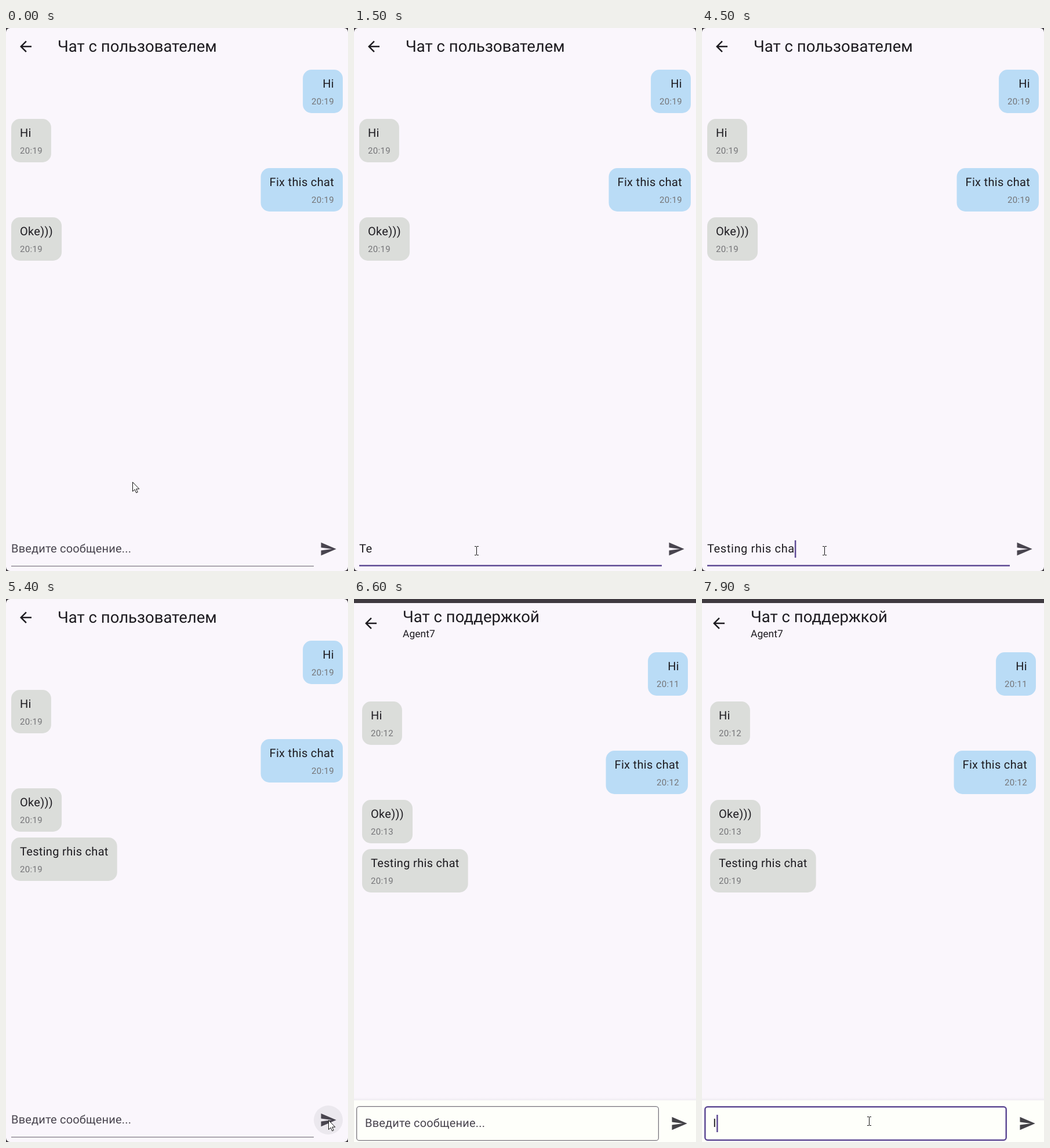
An HTML page with a canvas that plays this animation: 590 by 938 pixels, repeating every 8 s.

```html
<!DOCTYPE html>
<html lang="ru">
<head>
<meta charset="utf-8">
<title>Chat</title>
<style>
html, body { margin: 0; width: 100%; height: 100%; overflow: hidden; background: #3f3a40; }
canvas { display: block; }
</style>
</head>
<body>
<canvas width="590" height="938"></canvas>
<script>
const ctx = document.querySelector('canvas').getContext('2d');
ctx.textRendering = 'geometricPrecision';
const LOOP = 8000, SWITCH = 6300, SENT = 5400;
const INK = '#1d1b20', MUTED = '#49454f', ACCENT = '#5e4a94', DARK = '#3f3a40';
const PAGE = '#faf6fc', BLUE = '#badcf6', GREY = '#dbddda';
const BACK = new Path2D('M20 11H7.83l5.59-5.59L12 4l-8 8 8 8 1.41-1.41L7.83 13H20v-2z');
const SEND = new Path2D('M2.01 21L23 12 2.01 3 2 10l15 2-15 2z');
const ARROW = new Path2D('M.5 .5V16.5L4.2 13.2 6.7 18.9 9.2 17.8 6.7 12.2H11.8Z');
const HINT = 'Введите сообщение...';

// [text, sent by this user, time in first view, time in second view]
const messages = [
  ['Hi', true, '20:19', '20:11'],
  ['Hi', false, '20:19', '20:12'],
  ['Fix this chat', true, '20:19', '20:12'],
  ['Oke)))', false, '20:19', '20:13'],
  ['Testing rhis chat', false, '20:19', '20:19']
];

// when each letter of the typed message appears
const draft = messages[4][0];
const keys = [1000, 1100, 1600, 1700, 2000, 2200, 2400, 2700,
  3300, 3500, 3600, 3700, 3900, 4100, 4300, 4500, 4600];

// pointer way points: time, x, y
const way = [
  [0, 218, 784], [400, 211, 903], [5000, 211, 903], [5300, 556, 900], [5500, 556, 900],
  [5800, 499, 629], [5900, 522, 612], [6000, 557, 595], [6100, 620, 575],
  [7100, 600, 560], [7200, 560, 640], [7500, 288, 902], [LOOP, 288, 902]
];

function pointerAt(t) {
  const i = way.findIndex(p => p[0] > t), a = way[i - 1], b = way[i];
  const k = (t - a[0]) / (b[0] - a[0]);
  return [a[1] + (b[1] - a[1]) * k, a[2] + (b[2] - a[2]) * k];
}

function setFont(size, spacing) {
  ctx.font = size + 'px Roboto, sans-serif';
  ctx.letterSpacing = spacing + 'px';
}

// draws the text and returns its width
function text(str, x, y, size, color, spacing = 0) {
  setFont(size, spacing);
  ctx.fillStyle = color;
  ctx.fillText(str, x, y);
  return ctx.measureText(str).width;
}

function width(str, size) {
  setFont(size, 0.3125);
  return ctx.measureText(str).width;
}

function rect(x, y, w, h, color) {
  ctx.fillStyle = color;
  ctx.fillRect(x, y, w, h);
}

function round(x, y, w, h, r) {
  ctx.beginPath();
  ctx.roundRect(x, y, w, h, r);
}

function icon(path, x, y, color) {
  ctx.save();
  ctx.translate(x, y);
  ctx.scale(1.25, 1.25);
  ctx.fillStyle = color;
  ctx.fill(path);
  ctx.restore();
}

function bubble([str, mine, ...times], view, x, y) {
  const time = times[view], tw = width(time, 15), sw = width(str, 20);
  const w = Math.max(tw, sw) + 30, left = mine ? 590 - x - w : x;
  const place = own => mine ? left + w - 15 - own : left + 15;
  ctx.fillStyle = mine ? BLUE : GREY;
  round(left, y, w, 75, 15);
  ctx.fill();
  text(str, place(sw), y + 31, 20, INK, 0.3125);
  text(time, place(tw), y + 60, 15, '#757578', 0.3125);
}

// typed text or hint, with a caret that blinks anew after every key
function entry(str, x, y, focused, since) {
  const w = str ? text(str, x, y, 20, INK, 0.625) : 0;
  if (!str) text(HINT, x, y, 20, MUTED, 0.1875);
  if (focused && (since + 200) % 1000 < 500) rect(x + w, y - 21, 2.5, 30, ACCENT);
}

function hover(x, y, [px, py]) {
  if (Math.hypot(px - x, py - y) > 25) return;
  ctx.fillStyle = 'rgba(73,69,79,.08)';
  ctx.beginPath();
  ctx.arc(x, y, 25, 0, 7);
  ctx.fill();
}

function userChat(t, pointer) {
  rect(0, 0, 590, 938, DARK);
  ctx.fillStyle = PAGE;
  round(0, 0, 590, 938, 7);
  ctx.fill();
  icon(BACK, 19, 17, INK);
  text('Чат с пользователем', 89, 41, 27.5, INK);
  messages.slice(0, t < SENT ? 4 : 5).forEach((m, i) => bubble(m, 0, 9, 72 + 85 * i));
  const focused = t >= 600 && t < SENT;
  const count = t < SENT ? keys.filter(k => k <= t).length : 0;
  entry(draft.slice(0, count), 9, 906, focused, t - (count ? keys[count - 1] : 600));
  if (focused) rect(9, 927.5, 522, 2.5, ACCENT);
  else rect(9, 929, 522, 1.1, '#716c76');
  hover(556, 900, pointer);
  icon(SEND, 541, 885, MUTED);
}

function supportChat(t, pointer) {
  rect(0, 0, 590, 938, PAGE);
  rect(0, 0, 590, 7, DARK);
  icon(BACK, 14, 27, INK);
  text('Чат с поддержкой', 84, 40, 27.5, INK);
  text('Agent7', 84, 66, 17.5, INK);
  messages.forEach((m, i) => bubble(m, 1, 14, 92 + 85 * i));
  const shade = ctx.createLinearGradient(0, 861, 0, 866);
  shade.addColorStop(0, PAGE);
  shade.addColorStop(1, '#efecf1');
  rect(0, 861, 590, 5, shade);
  rect(0, 866, 590, 72, '#fefffa');
  const focused = t >= 7600, line = focused ? 2.5 : 1.25;
  ctx.strokeStyle = focused ? ACCENT : '#74707a';
  ctx.lineWidth = line;
  round(4 + line / 2, 876 + line / 2, 522 - line, 60 - line, 4.5);
  ctx.stroke();
  const typed = t >= 7800;
  entry(typed ? 'I' : '', 19, 912, focused, t - (typed ? 7800 : 7600));
  hover(561, 906, pointer);
  icon(SEND, 546, 891, '#434247');
}

function drawPointer([x, y]) {
  x = Math.round(x);
  y = Math.round(y);
  if (y > 872 && x < 530) {
    rect(x, y - 7, 1, 14, '#111');
    for (const dy of [-8, 7]) {
      rect(x - 3, y + dy, 3, 1, '#111');
      rect(x + 1, y + dy, 3, 1, '#111');
    }
    return;
  }
  ctx.save();
  ctx.translate(x, y);
  ctx.fillStyle = '#fff';
  ctx.strokeStyle = '#111';
  ctx.lineWidth = 1;
  ctx.fill(ARROW);
  ctx.stroke(ARROW);
  ctx.restore();
}

function frame(now) {
  const t = Math.floor(now % LOOP / 100) * 100;
  const pointer = pointerAt(t);
  (t < SWITCH ? userChat : supportChat)(t, pointer);
  drawPointer(pointer);
  requestAnimationFrame(frame);
}
frame(performance.now());
</script>
</body>
</html>
```
